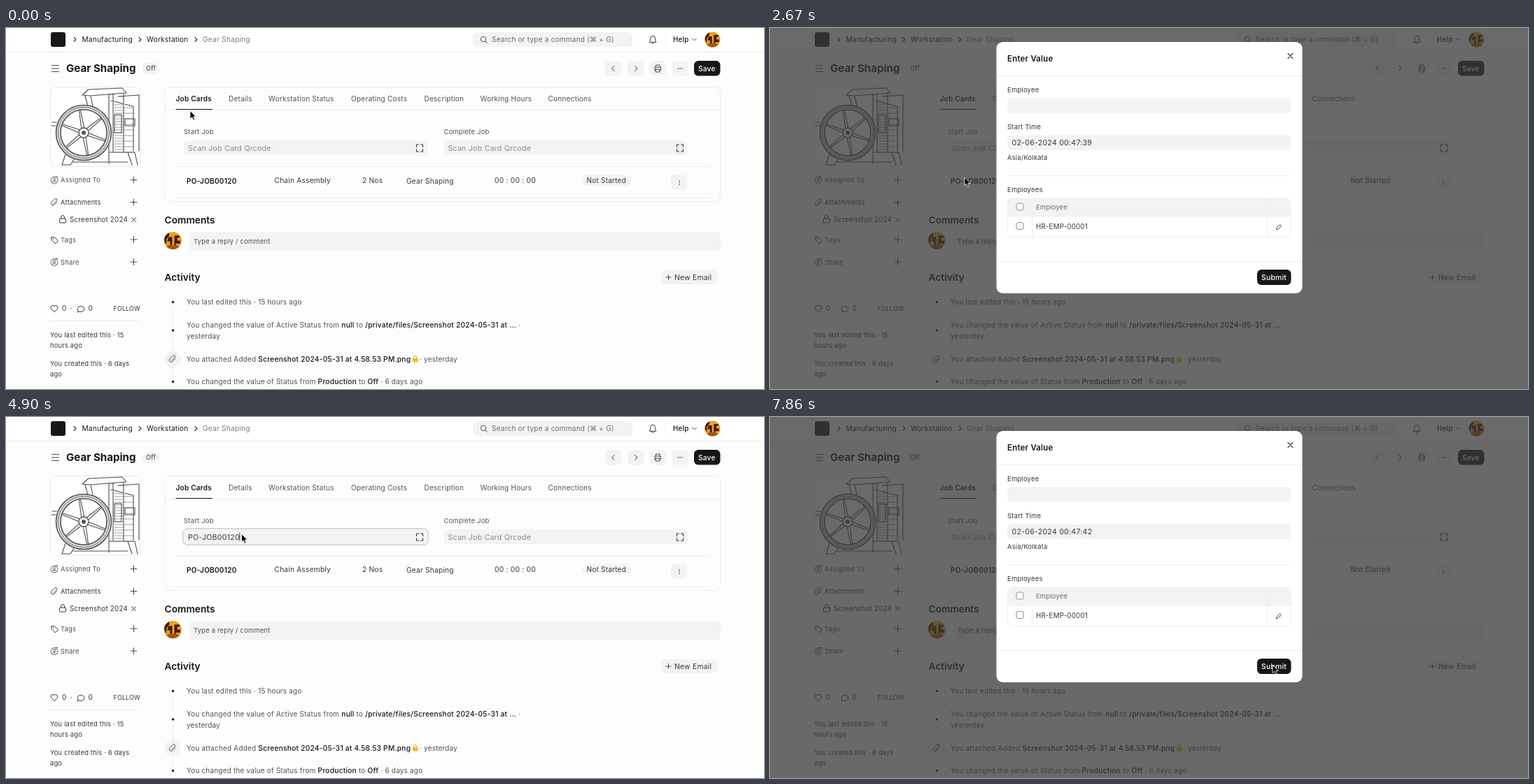
Recreate the animation shown at these times as an HTML page. Size 1083 px wide and 517 px high, loop 8 s.

```html
<!DOCTYPE html>
<html lang="en">
<meta charset="utf-8">
<title>Workstation</title>
<style>
  html, body { margin: 0; width: 100%; height: 100%; overflow: hidden; background: #fff }
  svg { display: block }
  text { font-family: Inter, "Noto Sans", "DejaVu Sans", sans-serif; letter-spacing: .02em; white-space: pre }
  .tight { letter-spacing: 0 }
  .line { fill: none; stroke: #383838; stroke-linecap: round; stroke-linejoin: round }
  .rule { fill: none; stroke: #ededed }
</style>
<svg id="stage" width="1083" height="517" viewBox="0 0 1083 517"></svg>
<script>
const INK = '#171717', TEXT = '#383838', MUTED = '#7c7c7c', FILL = '#f3f3f3', PAGE = '#fdfdfd';
const STATION = 'Gear Shaping', JOB = 'PO-JOB00120';

const text = (x, y, s, size = 10.1, fill = TEXT, weight = 400, extra = '') =>
  `<text x="${x}" y="${y}" font-size="${size}" fill="${fill}" font-weight="${weight}" ${extra}>${s}</text>`;
const box = (x, y, w, h, r, fill = FILL, extra = '') =>
  `<rect x="${x}" y="${y}" width="${w}" height="${h}" rx="${r}" fill="${fill}" ${extra}/>`;
const line = (d, width = 1, extra = '') => `<path class="line" d="${d}" stroke-width="${width}" ${extra}/>`;
const rule = d => `<path class="rule" d="${d}"/>`;
const disc = (x, y, r, fill = INK, extra = '') => `<circle cx="${x}" cy="${y}" r="${r}" fill="${fill}" ${extra}/>`;
const ring = (x, y, r, width) => disc(x, y, r, 'none', `stroke="#555" stroke-width="${width}"`);
const strong = s => `<tspan font-weight="450" font-size="10.25" fill="${INK}">${s}</tspan>`;
const dots = (x, y, dx, dy) => [-1, 0, 1].map(i => disc(x + i * dx, y + i * dy, .8, TEXT)).join('');
const clip = (x, y) => line(`M${x + 4} ${y - 1} l-4 4 a2.6 2.6 0 0 1 -4 -3.6 l4.5 -4.5 a1.8 1.8 0 0 1 2.7 2.6 l-4.3 4.3`, .9);
const plus = (x, y, r = 4.5) => line(`M${x - r} ${y} h${2 * r} M${x} ${y - r} v${2 * r}`, .9);
const scanIcon = x =>
  line(`M${x} 170.500 v-3.500 h3 M${x + 6} 167 h3 v3.500 M${x + 9} 173.500 v3.500 h-3 M${x + 3} 177 h-3 v-3.500`, 1.1);
const person = y => ring(69, y, 5, .9) + line(`M66 ${y + 3} q3 -3.500 6 0 M71 ${y - 5} l3 0`, .9) + ring(69, y - 1.5, 1.7, .9);

const avatar = (x, y, r) => `<g transform="translate(${x} ${y}) scale(${r / 12})">
  ${disc(0, 0, 12, '#eda31e')}
  <path d="M-12 0 A12 12 0 0 1 -5 -11 L-5 -7 L-9 -2 V6 Z M-6 -5 h5 v11 h-3 v-5 h-4 z M2 -7 h7 v3 h-3 v4 h4 v4 h-6 v7 h-2 z" fill="#43170a"/>
  <path d="M-9 8 A12 12 0 0 0 9 8 L4 6 H-5 Z" fill="#a85409"/></g>`;

function machine() {
  let spokes = '';
  for (let i = 0; i < 6; i++) {
    const a = i * Math.PI / 3 + .35, c = Math.cos(a), s = Math.sin(a);
    spokes += `M${111 + 7 * c - 2 * s} ${150 + 7 * s + 2 * c} L${111 + 32 * c - s} ${150 + 32 * s + c}
      M${111 + 7 * c + 2 * s} ${150 + 7 * s - 2 * c} L${111 + 32 * c + s} ${150 + 32 * s - c} `;
  }
  let ribs = '';
  for (let y = 110; y < 180; y += 4) ribs += `M155 ${y} h${y % 8 < 4 ? 28 : 13} `;
  const frame = 'M109 96 L118 88 L166 86 L172 93 L120 97 Z M113 97 L117 112 M121 97 L124 112 M147 95 V194 M153 94 V178 '
    + 'M168 93 V178 M182 112 V176 M155 124 h10 v26 h-10 z M170 130 h14 v10 h-14 z M148 178 H184 L188 196 M174 178 L180 196 '
    + 'M66 135 H72 M65 140 H71 M85 181 L80 196 H92 L97 188 M96 192 H174 M150 104 L181 112 M160 98 L190 96 V176';
  return `<g clip-path="url(#photo)">${box(63, 84, 129, 114, 8, '#fff')}
    ${line(frame, 1.1, 'style="stroke:#4a4a4a"')}${line(ribs, .7, 'style="stroke:#777"')}
    ${disc(111, 150, 40, '#dcdcdc')}${disc(111, 150, 33, '#fff')}
    ${ring(111, 150, 39.5, 1.6)}${ring(111, 150, 36.5, .8)}${ring(111, 150, 33, 1.6)}
    ${line(spokes, 1.1, 'style="stroke:#4a4a4a"')}${ring(111, 150, 7, 1.4)}${disc(111, 150, 3, '#555')}</g>
    ${box(63.5, 84.5, 128.5, 113.5, 8, 'none', 'stroke="#e8e8e8"')}`;
}

function navbar() {
  const chevron = x => line(`M${x} 13.500 l3 3 l-3 3`, 1.1);
  return rule('M0 34.500 H1083') + box(64, 6, 21, 21, 3, INK)
    + chevron(97) + text(108.5, 20.2, 'Manufacturing', 10.15, INK)
    + chevron(190) + text(201, 20.2, 'Workstation', 10.15, INK)
    + chevron(270) + text(281, 20.2, STATION, 10.2, MUTED)
    + box(667, 6, 228, 21, 6) + ring(682, 16, 3.7, 1) + line('M685 19 l2.500 2.500')
    + text(694, 20.2, 'Search or type a command (⌘ + G)', 10.05, '#6b6b6b')
    + line('M919.500 20 c1.500 -1.500 1 -3.500 1.300 -5.500 a3.300 3.300 0 0 1 6.600 0 c.300 2 -.200 4 1.300 5.500 z M922.500 21.700 q1.500 1.500 3 0')
    + rule('M942.500 8 V25') + text(953, 20.2, 'Help', 9.9, INK, 500) + line('M980.500 15 l3 3 l3 -3', .9)
    + avatar(1009.5, 16.5, 11);
}

function header() {
  return line('M65.500 53.500 h10 M65.500 58 h10 M65.500 62.500 h10', .9)
    + text(86, 63.3, STATION, 15.1, INK, 700, 'class="tight"')
    + box(195, 50, 25, 16, 8) + text(200, 61.4, 'Off', 9.2)
    + [856, 888, 919.5, 951.5].map(x => box(x, 47, 23.5, 21.5, 6)).join('')
    + line('M869 54.500 l-3.500 3.500 l3.500 3.500 M898.500 54.500 l3.500 3.500 l-3.500 3.500')
    + line('M928.500 56 v-3 h5.500 v3 M928.500 60.500 h-1.500 v-4.500 h8.500 v4.500 h-1.500 M928.500 59 h5.500 v4 h-5.500 z', .9)
    + dots(963.2, 58, 2.7, 0) + box(983, 47, 37.5, 21.5, 6, INK) + text(989, 61.6, 'Save', 10.2, '#fff', 500);
}

function sidebar() {
  return machine() + person(218) + text(78, 221.4, 'Assigned To', 9.4, '#525252') + plus(182.5, 217.5)
    + clip(69, 250) + text(78, 253.4, 'Attachments', 9.35) + plus(182.5, 249.5)
    + box(76.5, 273, 9, 6, 1, 'none', 'stroke="#383838"') + line('M78.500 273 v-2 a2.500 2.500 0 0 1 5 0 v2')
    + `<g clip-path="url(#file)">${text(91, 278.3, 'Screenshot 2024-05', 9.85)}</g>` + line('M179.500 271.500 l6 6 m0 -6 l-6 6')
    + line('M65 299.500 h4 l5.500 5 l-4 4.500 l-5.500 -5.500 z') + disc(67.5, 302, .8)
    + text(78, 306.6, 'Tags', 9.4, '#525252') + plus(182.5, 303)
    + person(335.5) + text(78, 339, 'Share', 9.4, '#525252') + plus(182.5, 335)
    + line('M69 406.500 l-4.300 -4.500 a2.700 2.700 0 0 1 4.300 -3.500 a2.700 2.700 0 0 1 4.300 3.500 z') + text(80, 405.1, '0', 10)
    + text(92, 405.1, '·', 10) + line('M103 405.500 l-.700 1.500 l2.500 -1 a5 4 0 1 0 -2.600 -2.300 z') + text(117.5, 405.1, '0', 10)
    + text(153.5, 404.8, 'FOLLOW', 8.9) + rule('M63 419.500 H192')
    + text(63, 443, 'You last edited this · 15', 9.35) + text(63, 458, 'hours ago', 9.35)
    + text(63, 484, 'You created this · 6 days', 9.35) + text(63, 499, 'ago', 9.35);
}

function card() {
  const tabs = [[318, 'Details'], [375, 'Workstation Status'], [493, 'Operating Costs'], [597.5, 'Description'],
    [677.5, 'Working Hours'], [774.5, 'Connections']];
  return box(226.5, 84.5, 794, 164, 8, PAGE, 'class="rule"') + rule('M227 117.500 H1020')
    + text(242.5, 104.9, 'Job Cards', 10.1, INK, 600) + tabs.map(([x, s]) => text(x, 104.9, s, 10.1, '#525252')).join('')
    + `<path d="M242.500 116.500 H295" stroke="${INK}"/>`
    + text(254, 152.4, 'Start Job', 9.5, '#525252') + text(625.5, 152.4, 'Complete Job', 9.5, '#525252')
    + box(252.5, 159.5, 351, 24, 7, '#e2e2e2', 'id="focus" stroke="#cfcfcf"') + box(254, 161, 348.5, 21, 6)
    + box(625.5, 161, 348.5, 21, 6) + scanIcon(586.5) + scanIcon(958.5)
    + text(260, 175.5, '', 10.65, MUTED, 400, 'id="entry"') + '<path id="caret" stroke="#171717" stroke-width=".8"/>'
    + text(631.5, 175.5, 'Scan Job Card Qrcode', 10.65, '#8a8a8a')
    + rule('M242 198.500 H1005 M242 243.500 H1005')
    + text(258, 223, JOB, 10.1, INK, 600) + text(383.5, 222, 'Chain Assembly', 10.2) + text(509, 222, '2 Nos', 10.2)
    + text(572, 223, STATION, 10.2) + text(698, 222, '00 : 00 : 00', 10.3)
    + box(824, 210.5, 69, 15.5, 7.5) + text(829.5, 222, 'Not Started', 10.05)
    + box(950, 210.5, 23.5, 21, 6) + dots(962, 221.5, 0, 2.7);
}

function activity() {
  const log = (y, s) => text(258, y, s, 9.98, '#525252');
  return text(226.5, 279.7, 'Comments', 13.75, INK, 600, 'class="tight"') + avatar(238.5, 304.5, 12.5)
    + box(262, 292, 759, 27.5, 6) + text(268, 309.2, 'Type a reply / comment', 9.45, '#525252')
    + text(226.5, 361.7, 'Activity', 13.75, INK, 600, 'class="tight"')
    + box(936, 347, 80, 20, 6) + plus(946.5, 357, 3.5) + text(955, 360.7, 'New Email', 10.4)
    + rule('M238.500 400 V425 M238.500 441 V499') + disc(238.5, 392.5, 1.7) + disc(238.5, 433, 1.7) + disc(238.5, 506.5, 1.7)
    + disc(238, 474, 11.5, FILL) + clip(238, 474.5)
    + log(396, 'You last edited this · 15 hours ago')
    + log(429, `You changed the value of Active Status from ${strong('null')} to ${strong('/private/files/Screenshot 2024-05-31 at ...')} ·`)
    + log(445, 'yesterday')
    + log(477.6, `You attached Added ${strong('Screenshot 2024-05-31 at 4.58.53 PM.png')}`)
    + box(581, 473, 7.5, 5.5, 1, '#f3b91f') + line('M582.700 473 v-1.500 a2 2 0 0 1 4 0 v1.500', 1, 'style="stroke:#d9a017"')
    + text(591, 477.6, '· yesterday', 9.98, '#525252')
    + log(510, `You changed the value of Status from ${strong('Production')} to ${strong('Off')} · 6 days ago`);
}

function modal() {
  const check = y => box(352, y, 10, 10, 2.5, '#fff', 'stroke="#8a8a8a"');
  return box(323.5, 20, 437, 360, 9, '#fff') + text(339, 48, 'Enter Value', 11.45, INK, 600)
    + line('M740 36.500 l7 7 m0 -7 l-7 7', 1.2) + rule('M324 68.500 H760 M324 334.500 H760 M339 211.500 H744')
    + text(339, 91.5, 'Employee', 9.5) + box(339, 100, 405, 21.5, 6)
    + text(339, 145.4, 'Start Time', 9.5) + box(339, 153.5, 405, 21.5, 6)
    + text(345.5, 168, '', 10.65, TEXT, 400, 'id="date"') + text(339, 189.4, 'Asia/Kolkata', 9.45)
    + text(339, 235.4, 'Employees', 9.5)
    + `<path d="M339.500 269.500 V251 a7 7 0 0 1 7 -7 H737 a7 7 0 0 1 7 7 V269.500 Z" fill="${FILL}"/>`
    + box(339.5, 244, 404.5, 55.5, 7, 'none', 'class="rule"') + rule('M339.500 269.500 H744 M374.500 270 V299 M710.500 244 V299')
    + check(251) + check(278.5) + text(380, 260.4, 'Employee', 9.45, '#6b6b6b') + text(380, 287.8, 'HR-EMP-00001', 9.75)
    + line('M723.500 288.500 l.500 -2.500 l4.500 -4.500 l2 2 l-4.500 4.500 z', .9)
    + box(696, 346, 48.5, 22, 6, INK) + text(702, 360.9, 'Submit', 10.4, '#fff', 500);
}

const $ = id => document.getElementById(id);
$('stage').innerHTML = `<defs><clipPath id="photo">${box(63, 84, 129, 114, 8)}</clipPath>
  <clipPath id="file">${box(91, 265, 82, 20, 0)}</clipPath></defs>
  ${box(0, 0, 1083, 35, 0, '#fff')}${box(0, 35, 1083, 482, 0, PAGE)}
  ${navbar()}${header()}${sidebar()}${card()}${activity()}
  ${box(0, 0, 1083, 517, 0, '#383838', 'id="backdrop"')}<g id="modal">${modal()}</g>
  <path id="cursor" d="M0 0 V11.500 L2.700 9.200 L4.600 13.500 L6.500 12.600 L4.700 8.500 H8.300 Z" fill="#000" stroke="#fff" stroke-width=".8"/>`;

// Pointer stops: step, x, y
const stops = [[0, 263, 118.5], [1, 298, 149], [2, 325, 171], [13, 325, 171], [18, 278, 214], [21, 278, 214],
  [27, 258, 211], [28, 312, 184], [29, 336.5, 167.5], [38, 336.5, 167.5], [46, 420, 275], [53, 718, 355]];

function pointer(n) {
  const i = Math.max(1, stops.findIndex(s => s[0] >= n));
  const [n0, x0, y0] = stops[i - 1], [n1, x1, y1] = stops[i];
  const u = (n - n0) / (n1 - n0), k = u * u * (3 - 2 * u);
  return `translate(${x0 + (x1 - x0) * k} ${y0 + (y1 - y0) * k})`;
}

const LOOP = 8000, STEP = 148.3;

function draw(now) {
  const n = Math.min(53, Math.floor((now % LOOP + 5) / STEP));
  const focused = n >= 4 && n < 11 || n >= 31 && n < 35;
  const typed = n === 8 ? JOB.slice(0, 7) : n === 9 || n === 10 || n === 33 || n === 34 ? JOB : '';
  $('focus').style.display = $('caret').style.display = focused ? '' : 'none';
  $('entry').textContent = typed || 'Scan Job Card Qrcode';
  $('entry').setAttribute('fill', typed ? TEXT : '#8a8a8a');
  $('caret').setAttribute('d', `M${260 + (typed ? $('entry').getComputedTextLength() : 0)} 165.500 v12`);

  const shade = n === 11 || n === 35 ? .4 : n === 21 ? .57 : n > 11 && n < 21 || n > 35 ? 1 : 0;
  const moving = n === 12 || n === 20 || n === 36;
  const shown = moving ? .4 : n > 12 && n < 20 || n > 36 ? 1 : 0;
  $('backdrop').setAttribute('opacity', shade * .75);
  $('modal').setAttribute('opacity', shown);
  $('modal').setAttribute('transform', `translate(0 ${moving ? -22.6 : 0})`);
  $('date').textContent = '02-06-2024 00:47:' + (n < 30 ? 39 : 42);
  $('cursor').setAttribute('transform', pointer(n));
  requestAnimationFrame(() => draw(performance.now()));
}
draw(performance.now());
</script>
</html>
```
